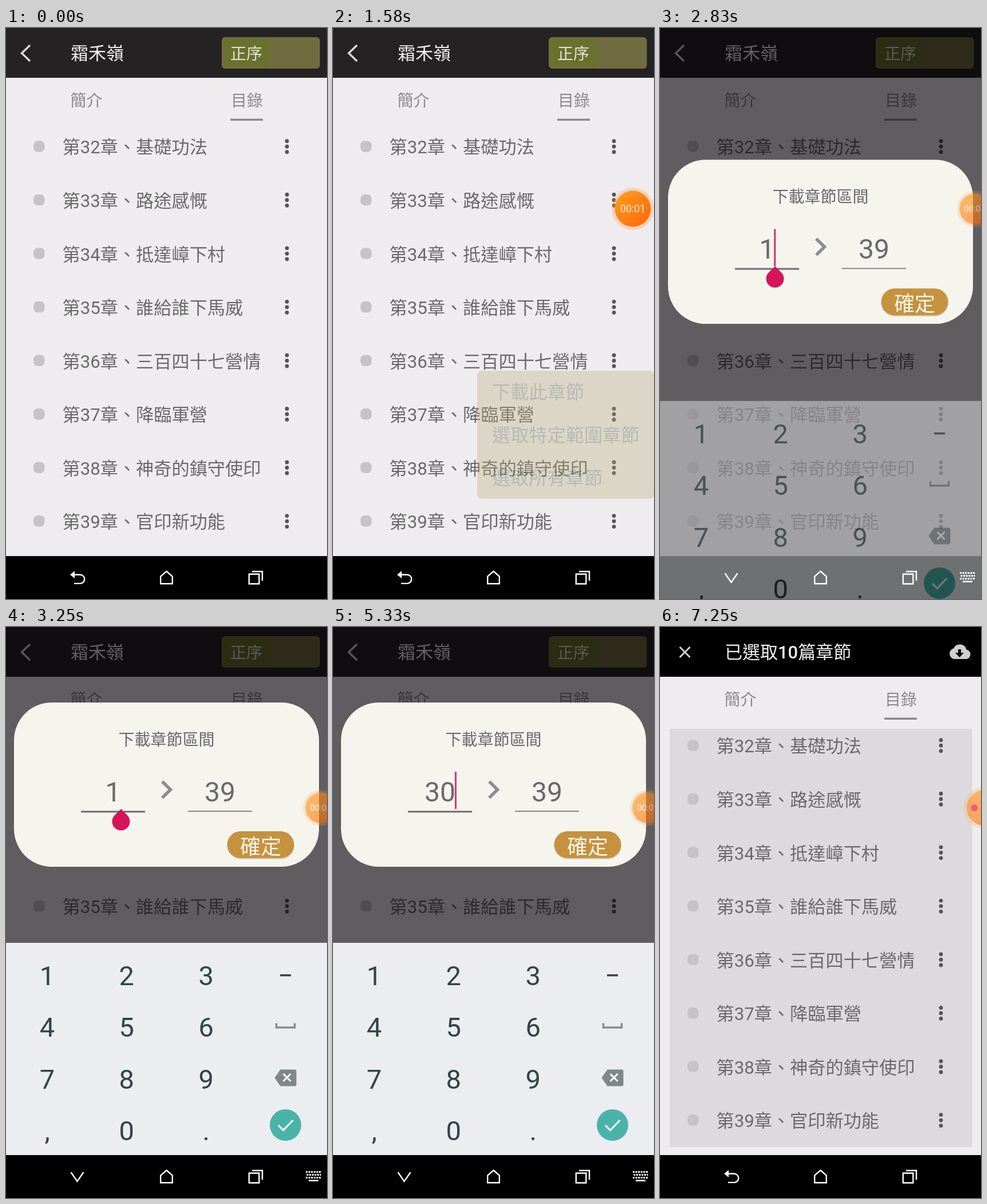
These frames come from a looping animation (561 by 998 pixels, 8000 ms). An HTML page:

```html
<!DOCTYPE html>
<html lang="zh-TW">
<head>
<meta charset="utf-8">
<title>章節下載</title>
<style>
  html, body { margin: 0; width: 100%; height: 100%; overflow: hidden; background: #000; }
  svg { display: block; width: 100vw; height: 100vh; }
  text { font-family: Roboto, "Noto Sans CJK TC", "Noto Sans CJK", sans-serif; }
  .mid { text-anchor: middle; }
  .line { fill: none; stroke: #fff; }
</style>
</head>
<body>
<svg viewBox="0 0 561 998">
  <defs>
    <linearGradient id="orange" x1="0" y1="0" x2="1" y2="1">
      <stop offset="0" stop-color="#ffa01c"/><stop offset="1" stop-color="#ff650c"/>
    </linearGradient>
  </defs>

  <rect width="561" height="998" fill="#eeecef"/>
  <rect width="561" height="87" fill="#242223"/>
  <path class="line" d="M42 30L27.500 44L42 58" style="stroke:#d8d7d8" stroke-width="3.500"/>
  <text x="113" y="55" font-size="31" fill="#f0eff0">霜禾嶺</text>
  <rect x="377" y="16" width="171.500" height="55" rx="6" fill="#716c40"/>
  <rect x="380" y="19" width="80" height="49" rx="5" fill="#69722c"/>
  <text x="392" y="55" font-size="28" fill="#e2e1dc">正序</text>

  <g id="picked">
    <rect width="561" height="87"/>
    <path class="line" d="M34.500 35l18 18m0-18l-18 18" style="stroke:#d0d0d0" stroke-width="3"/>
    <text x="113" y="55" font-size="31" fill="#eee">已選取<tspan font-weight="500">10</tspan>篇章節</text>
    <path d="M514 56a9.500 9.500 0 0 1-1-18.500a12 12 0 0 1 22.500 2a8.300 8.300 0 0 1-1 16.500z" fill="#cfcfcf"/>
    <path d="M521 39h5v6h5l-7.500 8l-7.500-8h5z"/>
    <rect x="17" y="178" width="528.500" height="731" fill="#dcdadc"/>
  </g>

  <g font-size="28" fill="#8a888b">
    <text x="112.500" y="137">簡介</text>
    <text x="393" y="137">目錄</text>
    <rect x="392" y="158.500" width="57" height="3.500"/>
  </g>
  <g id="list" font-size="31.200"></g>

  <g id="menu">
    <rect x="252" y="599" width="309" height="224" rx="8" fill="#b8ad74"/>
    <g font-size="32.200" fill="#56524c">
      <text x="278" y="648">下載此章節</text>
      <text x="278" y="723">選取特定範圍章節</text>
      <text x="278" y="798">選取所有章節</text>
    </g>
  </g>

  <rect id="dim" width="561" height="923" fill="rgba(2,0,2,.605)"/>

  <g id="dialog"><g id="lift">
    <rect x="14" y="132" width="533" height="287" rx="66" fill="#f5f5ee"/>
    <text class="mid" x="280.500" y="206.500" font-size="28" fill="#6b696b">下載章節區間</text>
    <g id="from" class="mid" font-size="48" fill="#6b696b"></g>
    <text class="mid" x="374" y="305" font-size="48" fill="#6b696b">39</text>
    <rect x="131" y="321.200" width="112" height="3.200" fill="#757375"/>
    <rect x="318" y="321.200" width="112" height="1.700" fill="#757375"/>
    <path class="line" d="M273 270l14.500 14.300L273 298.500" style="stroke:#8e8c8e" stroke-width="5.500"/>
    <rect x="387" y="359" width="117" height="47" rx="23.500" fill="rgba(90,70,40,.2)"/>
    <rect x="386.500" y="357" width="117" height="47" rx="23.500" fill="#c6923e"/>
    <text class="mid" x="445" y="396.500" font-size="36" fill="#f5f5ee">確定</text>
    <g id="caret"><rect id="blink" x="-1.300" y="253" width="2.600" height="65" fill="#c2185b"/></g>
    <path id="handle" d="M201 318l11 11a15.500 15.500 0 1 1-22 0z" fill="#d5145a"/>
  </g></g>

  <rect y="923" width="561" height="75"/>

  <g id="keys">
    <rect y="552" width="561" height="371" fill="#ebedf0"/>
    <g id="press"></g>
    <g id="digits" class="mid" font-size="47" fill="#314448"></g>
    <rect x="479" y="607" width="19" height="3.500" fill="#314448"/>
    <path class="line" d="M472.500 692.500v7.500h32v-7.500" style="stroke:#848b8f" stroke-width="3.500"/>
    <path d="M469.500 788l10-14.500h25q3 0 3 3v23q0 3-3 3h-25z" fill="#80878b"/>
    <path class="line" d="M484.500 781l13 13m0-13l-13 13" stroke-width="3"/>
    <circle cx="488.500" cy="870.500" r="27.500" fill="#4ab3a9"/>
    <path class="line" d="M476 871l8.500 8.500L501.500 862" stroke-width="3"/>
  </g>

  <g class="line" stroke-width="2.400">
    <g id="back">
      <path d="M118 955.500H129.500a7.700 7.700 0 0 1 0 15.400H119"/>
      <path d="M112 955.500l8-6.500v13z" fill="#fff" stroke="none"/>
    </g>
    <g id="hide">
      <path d="M113.500 953l11 16l11-16"/>
      <path d="M524 952.500h27M525.500 957.500h25M524 962.500h27" stroke-width="3" stroke-dasharray="3 1.600"/>
      <path d="M529 967.500h17" stroke-width="2.600"/>
    </g>
    <path d="M280.500 949.500l10.300 9V971.300H270.200V958.500z"/>
    <path d="M424.800 954.500h17.500v17h-17.500zM430 950H448V966"/>
  </g>

  <g id="bubble"><g id="glow">
    <circle r="37" fill="rgba(255,165,85,.33)"/>
    <circle r="31.500" fill="url(#orange)"/>
    <g id="timer" class="mid" font-size="17.700" fill="#fff4e6"></g>
    <circle id="dot" cx="-18" r="6" fill="#e8124e"/>
  </g></g>
</svg>

<script>
const LOOP = 8000, TICK = 1000 / 12, TICKS = 96;
const $ = id => document.getElementById(id);

function add(parent, tag, attrs, label) {
  const el = document.createElementNS('http://www.w3.org/2000/svg', tag);
  for (const k in attrs) el.setAttribute(k, attrs[k]);
  if (label) el.textContent = label;
  return parent.appendChild(el);
}

function track(el, prop, value) {
  const frames = [];
  for (let k = 0; k <= TICKS; k++) {
    const ms = Math.max(0, k * TICK - 4); // times are rounded down to 10 ms
    frames.push({ offset: k < TICKS ? ms / LOOP : 1,
      [prop]: value(Math.min(k, TICKS - 1)), easing: 'steps(1, end)' });
  }
  el.animate(frames, { duration: LOOP, iterations: Infinity });
}
const fade = (el, f) => track(el, 'opacity', f);
const show = (el, f) => fade(el, k => f(k) ? 1 : 0);
const move = (el, f) => track(el, 'transform', f);

const ramp = (k, a, b) => Math.min(1, Math.max(0, (k - a) / (b - a)));
const pulse = (k, a, b, c, d) => ramp(k, a, b) * (1 - ramp(k, c, d));

const chapters = ['基礎功法', '路途感慨', '抵達嶂下村', '誰給誰下馬威',
  '三百四十七營情', '降臨軍營', '神奇的鎮守使印', '官印新功能'];
chapters.forEach((name, i) => {
  const y = 207.2 + i * 93.55, g = $('list');
  add(g, 'rect', { x: 48, y: y - 10, width: 19.5, height: 19.5, rx: 7.5, fill: '#c5c4c4' });
  add(g, 'text', { x: 98.5, y: y + 12.2, fill: '#6b696b' }, `第${32 + i}章、${name}`);
  for (const d of [-9.5, 0, 9.5])
    add(g, 'circle', { cx: 491, cy: y + d, r: 3.4, fill: '#555355' });
});

const colX = c => 72 + c * 138.8;
const rowY = r => 609 + r * 90.3;
['123', '456', '789', ',0.'].forEach((row, r) => [...row].forEach((ch, c) =>
  add($('digits'), 'text', { x: colX(c), y: rowY(r) + 17 }, ch)));

// each edit of the first field, with the column and row of its key
const edits = [
  { at: 19, text: '1' },
  { at: 46, text: '', key: [3, 2] },
  { at: 56, text: '3', key: [2, 0] },
  { at: 60, text: '30', key: [1, 3] },
];
const lastEdit = k => edits.filter(e => e.at <= k).pop() || edits[0];
for (const e of edits) {
  show(add($('from'), 'text', { x: 187, y: 305 }, e.text), k => lastEdit(k) === e);
  if (!e.key) continue;
  const [c, r] = e.key;
  const key = add($('press'), 'rect',
    { x: colX(c) - 69, y: rowY(r) - 45, width: 138, height: 88, fill: 'rgba(40,60,70,.1)' });
  fade(key, k => pulse(k, e.at - 2, e.at - 1, e.at, e.at + 3));
}
move($('caret'), k => `translate(${187 + 13.7 * lastEdit(k).text.length}px, 0px)`);
show($('blink'), k => Math.floor((k - lastEdit(k).at) / 6) % 2 === 0);
show($('handle'), k => k >= 33 && k < 46);

const below = k => (1 - ramp(k, 33, 37)) ** 2.2;
fade($('menu'), k => pulse(k, 0, 3, 17, 20));
fade($('dim'), k => pulse(k, 19, 23, 81.9, 85));
fade($('dialog'), k => pulse(k, 20, 23, 81.5, 84));
move($('lift'), k => `translate(0px, ${185 * below(k)}px)`);
fade($('keys'), k => pulse(k, 33, 35.1, 83, 86));
move($('keys'), k => `translate(0px, ${188 * (below(k) * (k > 32) + ramp(k, 83, 86))}px)`);
fade($('picked'), k => ramp(k, 83, 86));
show($('hide'), k => k > 33 && k < 86);
show($('back'), k => k <= 33 || k >= 86);

// recorder bubble: docks at the edge, then grows back when stopped
const dock = k => ramp(k, 23, 25), stop = k => ramp(k, 78, 80);
move($('bubble'), k => `translate(${524 + 26 * dock(k) + 17.5 * stop(k)}px, 316px) ` +
  `scale(${1 - .15 * (dock(k) - stop(k))})`);
fade($('glow'), k => ramp(k, 0, 2) * (1 - .37 * dock(k) + .2 * stop(k) - .18 * ramp(k, 82, 86)));
for (let s = 0; s < 6; s++)
  show(add($('timer'), 'text', { y: 6.3 }, `00:0${s}`),
    k => k < 79 && Math.min(5, Math.floor(k / 12.8)) === s);
show($('dot'), k => k >= 79);
</script>
</body>
</html>
```
